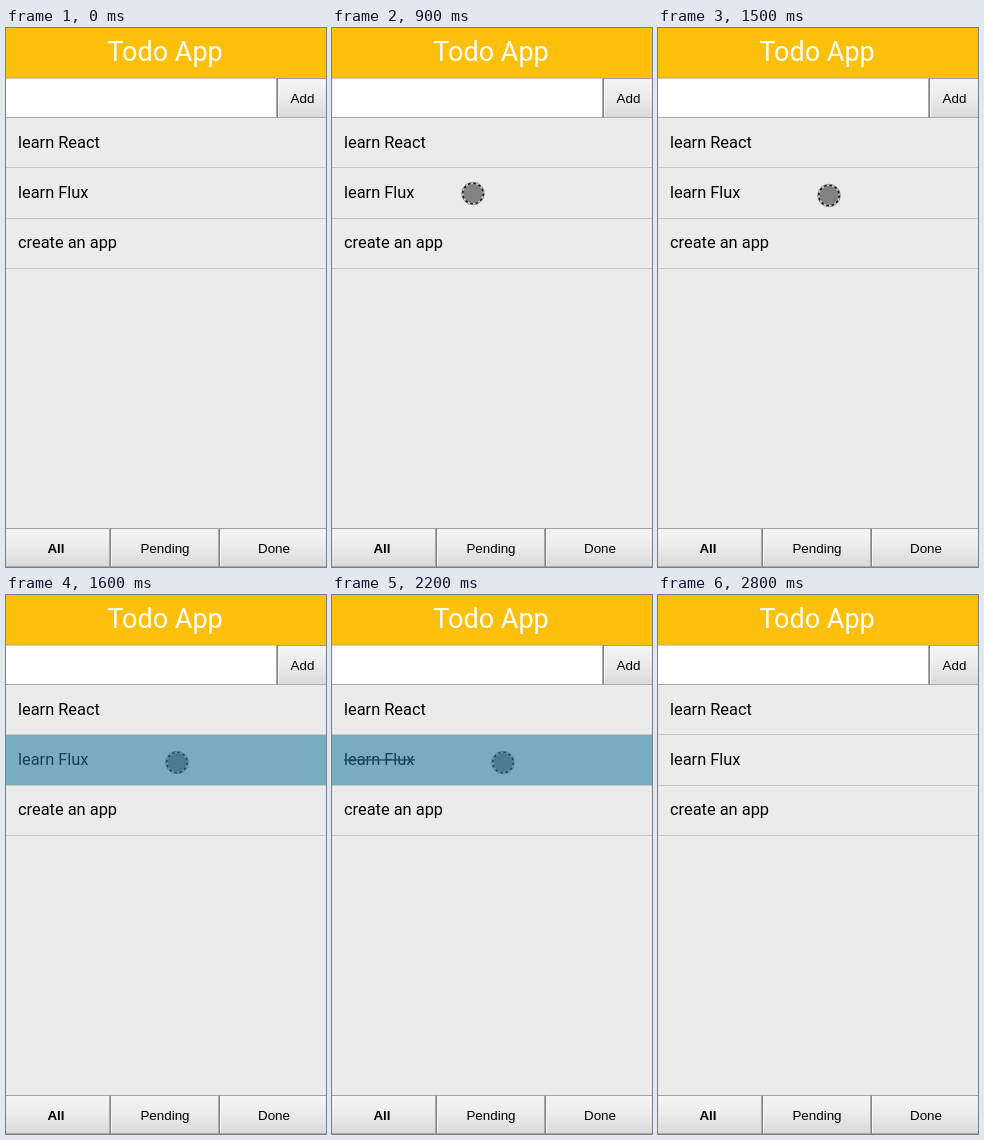
An HTML page with a canvas that plays this animation: 320 px wide and 539 px high, repeating every 4700 ms.

```html
<!DOCTYPE html>
<html lang="en">
<head>
<meta charset="utf-8">
<title>Todo App</title>
<style>
  html, body { margin: 0; width: 100%; height: 100%; overflow: hidden; background: #ebebeb; }
  canvas { display: block; width: 320px; height: 539px; }
</style>
</head>
<body>
<canvas id="stage" width="320" height="539"></canvas>
<script>
const ctx = document.getElementById('stage').getContext('2d');
const LOOP = 4700, STEP = 100;
const ITEMS = ['learn React', 'learn Flux', 'create an app'];
const BODY = '16.4px Roboto, sans-serif';
const BUTTON = '13.4px "Liberation Sans", Arial, sans-serif';

// Pointer path: [time, x]; y follows a slightly sloping line.
const PATH = [[400, 215], [500, 162.5], [900, 141], [1200, 141],
              [1500, 171], [2400, 171], [2700, 335]];

function rect(x, y, w, h, fill) {
  ctx.fillStyle = fill;
  ctx.fillRect(x, y, w, h);
}

function text(str, x, y, font, color = '#000', align = 'left') {
  ctx.font = font;
  ctx.fillStyle = color;
  ctx.textAlign = align;
  ctx.fillText(str, x, y);
}

function button(label, x, y, w, h, cx, bold) {
  const shade = ctx.createLinearGradient(0, y, 0, y + h);
  shade.addColorStop(0, '#f5f5f5');
  shade.addColorStop(0.45, '#ececec');
  shade.addColorStop(1, '#d9d9d9');
  rect(x, y, w, h, shade);
  rect(x, y, w, 1, '#a0a0a0');
  rect(x, y + h - 1, w, 1, '#aaaaaa');
  if (x > 0) {
    rect(x - 1, y, 1, h, '#a6a6a6');
    rect(x, y, 1, h, '#858585');
    rect(x + 1, y + 1, 1, h - 2, '#f7f7f7');
  }
  text(label, cx, y + h / 2 + 5.2, (bold ? 'bold ' : '') + BUTTON, '#000', 'center');
}

function ring(x, y, r, width, color, dash = []) {
  ctx.beginPath();
  ctx.arc(x, y, r, 0, Math.PI * 2);
  ctx.setLineDash(dash);
  ctx.lineWidth = width;
  ctx.strokeStyle = color;
  ctx.stroke();
  ctx.setLineDash([]);
}

function pointerX(t) {
  const i = PATH.findIndex(p => p[0] > t);
  const [t0, x0] = PATH[i - 1], [t1, x1] = PATH[i];
  const u = (t - t0) / (t1 - t0);
  return x0 + (x1 - x0) * u * (2 - u);
}

function pointer(x) {
  const y = 156.1 + x * 0.0667;
  ctx.beginPath();
  ctx.arc(x, y, 11, 0, Math.PI * 2);
  ctx.fillStyle = '#828282';
  ctx.fill();
  ring(x, y, 11.3, 1, '#8c8c8c');
  ring(x, y, 10.2, 1.4, '#c6c6c6');
  ring(x, y, 10.2, 1.6, '#161616', [2.7, 2.64]);
}

function draw(t) {
  const done = t >= 1800 && t < 2400;
  const pressed = (t >= 1600 && t < 1800) || (t >= 2200 && t < 2400);

  rect(0, 0, 320, 539, '#ebebeb');
  rect(0, 0, 320, 50, '#fdc00a');
  text('Todo App', 159, 33, '27px Roboto, sans-serif', '#fffdf5', 'center');

  rect(0, 50, 270, 40, '#fefefe');
  rect(0, 49.5, 270, 1, '#b5a878');
  rect(0, 89, 270, 1, '#a8a8a8');
  button('Add', 271, 50, 49, 40, 296.5);

  ITEMS.forEach((item, i) => {
    const y = 89.5 + i * 50.25;
    text(item, 12, y + 30.4, BODY);
    rect(0, Math.round(y + 49.8), 320, 1, '#c6c6c6');
    if (i === 1 && done) rect(12, 164.3, 71, 1.3, '#111');
  });

  button('All', 0, 500, 104, 39, 50, true);
  button('Pending', 104, 500, 109, 39, 159);
  button('Done', 213, 500, 107, 39, 268);

  if (t >= 400 && t < 2700) pointer(pointerX(t));
  if (pressed) rect(0, 140, 320, 50, 'rgba(26, 120, 157, 0.55)');
}

const start = performance.now();
function frame() {
  const t = (performance.now() - start) % LOOP;
  draw(Math.floor(t / STEP) * STEP);
  requestAnimationFrame(frame);
}
frame();
</script>
</body>
</html>
```
